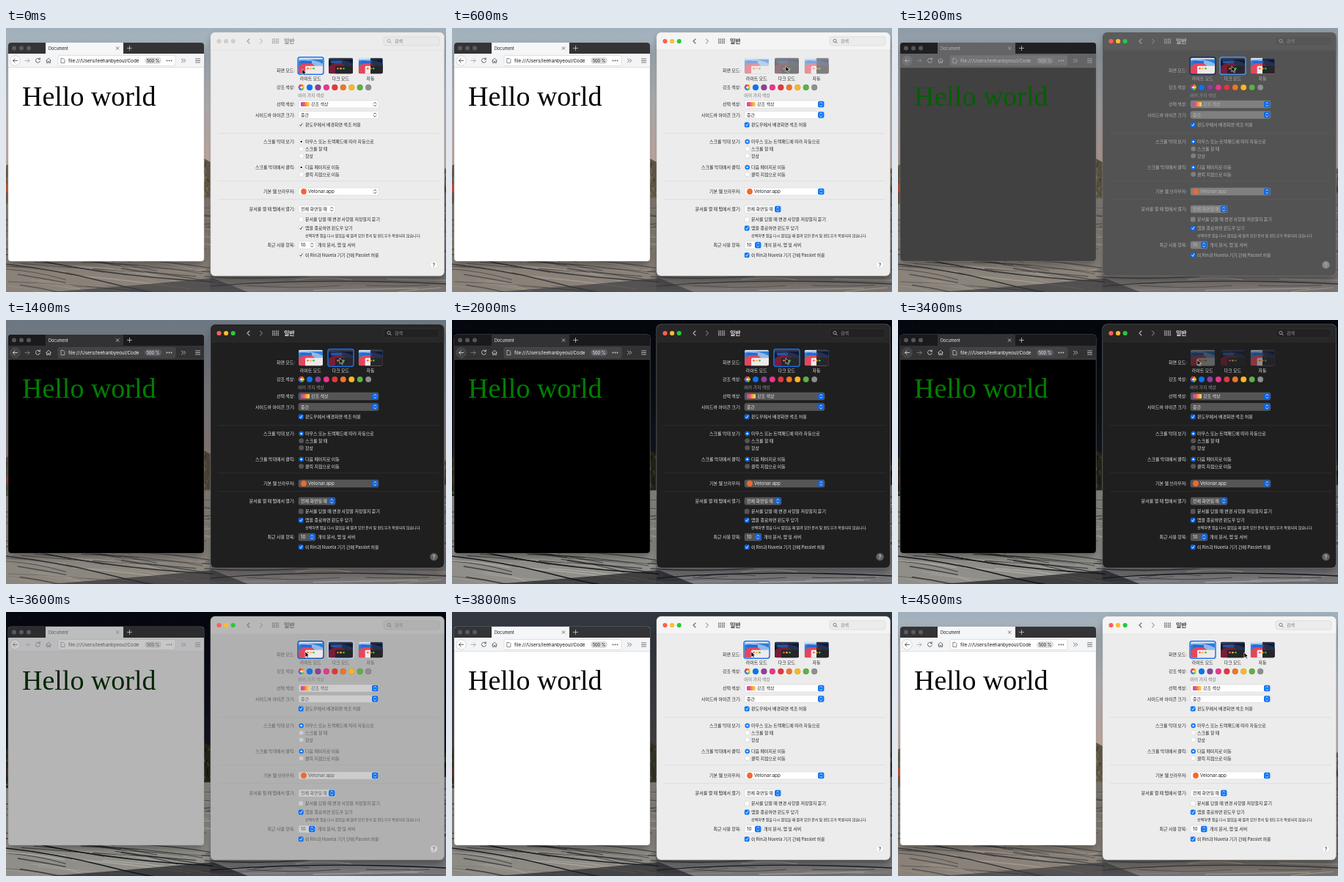
An HTML page that plays this animation: 600x360 px, repeating every 4.6 s.

```html
<!DOCTYPE html>
<html>
<head>
<meta charset="utf-8">
<title>Appearance switch</title>
<style>
html, body { margin: 0; width: 100%; height: 100%; overflow: hidden; background: #000; }
svg { display: block; width: 600px; height: 360px; }
text { white-space: pre; font-family: "Noto Sans CJK KR", "Noto Sans CJK", "Noto Sans CJK JP", sans-serif; font-weight: 500; }
text.ui { font-family: Inter, "Noto Sans CJK KR", sans-serif; font-weight: 400; }
text.serif { font-family: "Liberation Serif", "Times New Roman", serif; font-weight: 400; }
</style>
</head>
<body>
<svg id="stage" viewBox="0 0 600 360" xmlns="http://www.w3.org/2000/svg"></svg>
<script>
const LOOP = 4600, STEP = 100;

const light = {
  id: 'light', pick: 0, win: '#ececec', bar: '#f4f4f4', edge: '#b9b9b9', line: '#d6d6d6',
  ink: '#252525', soft: '#7b7b7b', title: '#3a3a3a', tool: '#666', field: '#fff', fieldEdge: '#cfcfcf',
  search: '#ececec', accent: '#0a74f5', mark: '#fff', lamps: ['#fe5f57', '#febc2e', '#28c840'],
  strip: '#343437', tab: '#f5f6f7', nav: '#f3f4f5', navInk: '#55555a', url: '#fff', urlEdge: '#c6c6ca',
  urlInk: '#18181a', badge: '#dededf', page: '#fff', hello: '#000', lampOff: '#5c5c60', help: '#fff'
};
const idle = { ...light, id: 'idle', bar: '#ececec', title: '#8d8d8d', tool: '#a0a0a0', search: '#e8e8e8',
  accent: '#fff', mark: '#222', lamps: ['#cfcfcf', '#cfcfcf', '#cfcfcf'] };
const dark = {
  id: 'dark', pick: 1, win: '#1f1f1f', bar: '#272727', edge: '#555', line: '#363636',
  ink: '#e6e6e6', soft: '#9a9a9a', title: '#e4e4e4', tool: '#b5b5b5', field: '#555', fieldEdge: '#626262',
  search: '#222', accent: '#0a63e0', mark: '#fff', lamps: ['#fe5f57', '#febc2e', '#28c840'],
  strip: '#1a1a1d', tab: '#323234', nav: '#323234', navInk: '#d2d2d5', url: '#434346', urlEdge: '#57575a',
  urlInk: '#f4f4f6', badge: '#5d5d61', page: '#000', hello: '#008000', lampOff: '#55555a', help: '#626262'
};

const rect = (x, y, w, h, fill, r = 0, more = '') =>
  `<rect x="${x}" y="${y}" width="${w}" height="${h}" rx="${r}" fill="${fill}" ${more}/>`;
const dot = (x, y, r, fill, more = '') => `<circle cx="${x}" cy="${y}" r="${r}" fill="${fill}" ${more}/>`;
const line = (d, color, w = 1, more = '') =>
  `<path d="${d}" fill="none" stroke="${color}" stroke-width="${w}" stroke-linecap="round" stroke-linejoin="round" ${more}/>`;
// y is the middle of the line of text
const text = (x, y, s, fill, size = 6, more = '') =>
  `<text x="${x}" y="${y + size * .37}" font-size="${size}" fill="${fill}" ${more}>${s}</text>`;
const border = (color, w = .5) => `stroke="${color}" stroke-width="${w}"`;
const UI = 'class="ui"';

function random(seed) {
  return () => (seed = (seed * 16807) % 2147483647) / 2147483647;
}

function wallpaper(night) {
  const rnd = random(77);
  const c = night
    ? { sky: ['#05070e', '#0a0d16', '#151821'], land: '#25281d', leaf: ['#47502b', '#11130e', '#3a3a24'],
        wood: '#8f8e89', slate: '#77777a', deep: '#15161a', pale: '#bdbbb4', spot: '#3d2823' }
    : { sky: ['#a0b0bc', '#bfc0c3', '#d8b8ac'], land: '#6c6250', leaf: ['#83804d', '#443f36', '#a18a6c'],
        wood: '#8a8279', slate: '#77726e', deep: '#393a3e', pale: '#b3a89a', spot: '#c4573f' };
  const id = 'sky' + (night ? 1 : 0);
  let s = `<linearGradient id="${id}" x2="0" y2="1">` +
    c.sky.map((k, i) => `<stop offset="${i / 2}" stop-color="${k}"/>`).join('') + '</linearGradient>';
  s += rect(0, 0, 600, 195, `url(#${id})`);
  if (night) for (let i = 0; i < 60; i++) s += dot(rnd() * 600, rnd() * 170, .35, '#aab', 'opacity=".6"');
  s += `<path d="M0 188L6 183 270 178 281 184 590 190 600 192V360H0Z" fill="${c.land}"/>`;
  for (let i = 0; i < 70; i++) {
    const x = [0, 268, 596][i % 3] + rnd() * 12, y = 182 + rnd() * 58;
    s += line(`M${x} ${y}l${rnd() * 5 - 2.5} ${2 + rnd() * 5}`, c.leaf[i % 7 % 3], 1.3);
  }
  s += `<ellipse cx="0" cy="218" rx="4" ry="7" fill="${c.spot}"/>`;
  s += `<path d="M0 240L140 236 285 232 285 360H0Z" fill="${c.wood}"/>`;
  s += `<path d="M278 240L600 225V360H278Z" fill="${c.slate}"/>`;
  for (let i = 0; i < 90; i++) {
    const y = 230 + rnd() * 130, x = rnd() * 190 - 30, w = 60 + rnd() * 120, bow = rnd() * 8 - 1;
    s += line(`M${x} ${y}q${w / 2} ${bow} ${w} ${9 + rnd() * 13}`, i % 2 ? c.pale : c.deep, .4 + rnd() * 1.2, 'opacity=".65"');
  }
  for (let i = 0; i < 90; i++) {
    const y = 230 + rnd() * 134, x = 255 + rnd() * 310, w = 40 + rnd() * 110, bow = rnd() * 12 - 6;
    s += line(`M${x} ${y}q${w / 2} ${bow} ${w} ${rnd() * 8 - 6}`, i % 2 ? c.pale : c.deep, .4 + rnd() * 1.2, 'opacity=".6"');
  }
  s += `<path d="M60 360Q170 352 282 341L330 360Z" fill="${c.deep}" opacity=".65"/>`;
  s += line('M0 322Q70 330 130 345T200 360', c.deep, 1.6);
  s += line('M40 316Q140 338 280 346', c.deep, 1.4);
  s += line('M280 352Q420 340 600 349', c.deep, 1.4);
  return s;
}

function browser(p) {
  let s = rect(3, 20, 267, 298, p.page, 4, border(p.edge, .4));
  s += `<path d="M3 36V24a4 4 0 0 1 4-4H266a4 4 0 0 1 4 4V36Z" fill="${p.strip}"/>`;
  for (const x of [11, 21, 31]) s += dot(x, 27.5, 3, p.lampOff);
  s += rect(54, 20, 106, 16, p.tab);
  s += text(58, 27.5, 'Document', p.urlInk, 5.5, UI);
  s += line('M150.3 25.8l3.6 3.6m0-3.6l-3.6 3.6', p.navInk, .8);
  s += line('M165.5 27.5h6m-3-3v6', '#c9c9cc', .8);
  s += rect(3, 35, 267, 19, p.nav) + rect(3, 53.6, 267, .5, p.urlEdge);

  s += dot(12.5, 44.5, 6.8, p.url, border(p.urlEdge, .7));
  s += line('M15.5 44.5h-6m2.6-2.6l-2.6 2.6 2.6 2.6', p.navInk, .9);
  s += line('M26 44.5h6m-2.6-2.6l2.6 2.6-2.6 2.6', p.navInk, .9, 'opacity=".45"');
  s += line('M46 42.6a3 3 0 1 0 .4 2.6m-.1-4.4v2h-2', p.navInk, .9);
  s += line('M54.6 44.6l3.4-3.3 3.4 3.3m-5.8-.6v3.6h1.6v-2h1.6v2h1.6v-3.6', p.navInk, .8);
  s += rect(71, 37.5, 160, 14, p.url, 2, border(p.urlEdge));
  s += line('M75.3 41.5h2.8l1.8 1.8v4.4h-4.6z', p.navInk, .7);
  s += `<g clip-path="url(#urlClip)">${text(85, 44.5, 'file:///Users/leehanbyeoul/Code', p.urlInk, 6.4, UI)}</g>`;
  s += rect(189, 40, 23, 9, p.badge, 4.5);
  s += text(200.5, 44.5, '500 %', p.urlInk, 5.7, UI + ' text-anchor="middle"');
  for (const x of [219.5, 222.5, 225.5]) s += dot(x, 44.5, .9, p.navInk);
  s += line('M239.5 42.2l2.3 2.3-2.3 2.3m3-4.6l2.3 2.3-2.3 2.3', p.navInk, .8);
  s += line('M258.5 42h6m-6 2.5h6m-6 2.5h6', p.navInk, .8);
  return s + `<text class="serif" x="22" y="105.5" font-size="38" fill="${p.hello}">Hello world</text>`;
}

function thumb(x, kind) {
  const half = night => {
    const [a, b, c, win] = night
      ? ['#101a38', '#26304f', '#741f36', '#26262a'] : ['#2c7fd8', '#8fb9ea', '#e2475c', '#f0e9ea'];
    return rect(0, 0, 33, 21.5, a) +
      `<path d="M0 12Q11 2 33 9V22H0Z" fill="${c}"/><path d="M0 4Q13 2 20 9T33 13V8Q20 1 0 1Z" fill="${b}"/>` +
      rect(0, 0, 33, 2, night ? '#3a3f52' : '#dce8f5') + rect(3, 4, 15, 3.6, night ? '#2456a5' : '#2868d5', 1) +
      rect(9, 11, 25, 12, win, 1.5) +
      ['#fe5f57', '#febc2e', '#28c840'].map((k, i) => dot(12.5 + i * 4, 14.5, 1.3, k)).join('');
  };
  const art = kind < 2 ? half(kind) : half(0) + `<g clip-path="url(#rightHalf)">${half(1)}</g>`;
  return `<g transform="translate(${x} 40.7)"><g clip-path="url(#thumbClip)">${art}` +
    `${rect(0, 0, 33, 21.5, '#000', 0, `class="press${kind}" opacity="0"`)}</g></g>`;
}

function popup(p, y, w, label, inset = 3, cls = '') {
  const r = 399 + w;
  return rect(399, y - 5, w, 10, p.field, 2.3, border(p.fieldEdge)) +
    rect(r - 9, y - 4.3, 8.4, 8.6, p.accent, 2) +
    line(`M${r - 6.4} ${y - 1.1}l1.6-1.6 1.6 1.6m-3.2 2.2l1.6 1.6 1.6-1.6`, p.mark, .8) +
    text(399 + inset, y, label, p.ink, cls ? 6.4 : 6, cls);
}

function check(p, y, label, on) {
  const box = on ? p.accent : p.field;
  return rect(399, y - 3.2, 6.4, 6.4, box, 1.5, border(on && p.mark === '#fff' ? box : p.edge, .4)) +
    (on ? line(`M400.6 ${y + .1}l1.3 1.6 2-3.4`, p.mark, .9) : '') + text(408, y, label, p.ink);
}

function radio(p, y, label, on) {
  return dot(402.7, y, 3.3, on ? p.accent : p.field, border(p.edge, .4)) +
    (on ? dot(402.7, y, 1.3, p.mark) : '') + text(408, y, label, p.ink);
}

function settings(p) {
  let s = rect(279, 6, 318.5, 332, p.win, 6, border(p.edge));
  s += `<path d="M279.2 30V12a6 6 0 0 1 6-5.8H591.3a6 6 0 0 1 6 5.8V30Z" fill="${p.bar}"/>`;
  s += rect(279, 29.8, 318.5, .5, p.line);
  p.lamps.forEach((k, i) => s += dot(290.5 + i * 9.6, 18, 3.1, k));
  s += line('M332 15l-3 3 3 3', p.tool, 1.1) + line('M346.5 15l3 3-3 3', p.tool, 1.1, 'opacity=".5"');
  for (let i = 0; i < 12; i++) s += rect(363 + i % 4 * 2.5, 14.6 + (i >> 2) * 2.5, 1.6, 1.6, p.tool);
  s += text(379, 18, '일반', p.title, 8, 'style="font-weight:700"');
  s += rect(515, 12, 76, 12, p.search, 3, border(p.line, .7));
  s += dot(522, 17.5, 2.1, 'none', border(p.tool, .8)) + line('M523.6 19.1l1.7 1.7', p.tool, .8);
  s += text(530, 18, '검색', p.soft);

  const labels = { 58: '화면 모드:', 81: '강조 색상:', 104: '선택 색상:', 118.5: '사이드바 아이콘 크기:',
    155: '스크롤 막대 보기:', 190: '스크롤 막대에서 클릭:', 223: '기본 웹 브라우저:',
    247: '문서를 열 때 탭에서 열기:', 296: '최근 사용 항목:' };
  for (const y in labels) s += text(394, +y, labels[y], p.ink, 6, 'text-anchor="end"');

  const spots = [399, 440, 480.7];
  s += rect(spots[p.pick] - 1, 39.7, 35, 23.5, 'none', 3, `class="ring" ${border('#1676f0', 1.5)}`);
  s += `<g class="thumbs">${spots.map(thumb).join('')}</g>`;
  ['라이트 모드', '다크 모드', '자동'].forEach((name, i) =>
    s += text(spots[i] + 16.3, 69, name, p.ink, 6, 'text-anchor="middle"'));

  const wheel = ['#f7821b', '#ffc600', '#62ba46', '#0a7aff', '#a550a7', '#e0383e'];
  s += wheel.map((k, i) => `<path d="M402.7 81v-4.2a4.2 4.2 0 0 1 3.64 2.1Z" fill="${k}" transform="rotate(${i * 60} 402.7 81)"/>`).join('');
  s += dot(402.7, 81, 1.5, '#fff');
  ['#0a74f5', '#8f3f98', '#e8378b', '#e0383e', '#f0752a', '#f9b825', '#5cb143', '#8e8e90'].forEach((k, i) =>
    s += dot(414 + i * 11.45, 81, 4, k, border('rgba(0,0,0,.25)', .4)));
  s += text(398, 91.5, '여러 가지 색상', p.soft);

  s += popup(p, 104, 109, '강조 색상', 17) + rect(402, 101, 12, 6, 'url(#swatch)', 1);
  s += popup(p, 118.5, 109, '중간');
  s += check(p, 132, '윈도우에서 배경화면 색조 허용', 1);
  for (const y of [143.5, 208.5, 233.5]) s += rect(289, y, 302, .6, p.line);
  s += radio(p, 155, '마우스 또는 트랙패드에 따라 자동으로', 1);
  s += radio(p, 164.7, '스크롤 할 때') + radio(p, 174.3, '항상');
  s += radio(p, 190, '다음 페이지로 이동', 1) + radio(p, 199.5, '클릭 지점으로 이동');
  s += popup(p, 223, 109, 'Velonar.app', 13, UI) + dot(406, 223, 3.9, '#f2682c');
  s += popup(p, 247, 50, '전체 화면일 때');
  s += check(p, 261, '문서를 닫을 때 변경 사항을 저장할지 묻기');
  s += check(p, 273, '앱을 종료하면 윈도우 닫기', 1);
  s += text(408, 283, '선택하면 앱을 다시 열었을 때 열려 있던 문서 및 윈도우가 복원되지 않습니다.', p.ink, 5.05);
  s += popup(p, 296, 23, '10', 3, UI) + text(425, 296, '개의 문서, 앱 및 서버', p.ink);
  s += check(p, 309.7, '이 Rin과 Nuvela 기기 간에 Passlet 허용', 1);
  s += dot(583.5, 323, 5, p.help, border(p.fieldEdge));
  return s + text(583.5, 323, '?', p.ink, 7.5, UI + ' text-anchor="middle"');
}

const scene = p => `<g id="${p.id}">${browser(p)}${settings(p)}</g>`;
const stage = document.getElementById('stage');
stage.innerHTML = `<defs>
  <clipPath id="urlClip"><rect x="84" y="38" width="102" height="13"/></clipPath>
  <clipPath id="thumbClip"><rect width="33" height="21.5" rx="2.5"/></clipPath>
  <clipPath id="rightHalf"><rect x="16.5" width="17" height="22"/></clipPath>
  <linearGradient id="swatch"><stop stop-color="#b34fc4"/><stop offset=".35" stop-color="#f0566b"/>
    <stop offset=".7" stop-color="#fbb03c"/><stop offset="1" stop-color="#f7d774"/></linearGradient>
  <filter id="blur" x="-20%" y="-20%" width="140%" height="140%"><feGaussianBlur stdDeviation="6"/></filter>
  </defs>
  <g>${wallpaper(false)}</g><g id="night">${wallpaper(true)}</g>
  <g filter="url(#blur)" opacity=".4">${rect(4, 26, 265, 296, '#000', 5)}${rect(280, 13, 317, 330, '#000', 6)}</g>
  ${[light, idle, dark].map(scene).join('')}
  <path id="cursor" d="M0 0V7.6L1.8 6 3.1 8.8 4.4 8.2 3.1 5.5H5.5Z" fill="#000" stroke="#fff" stroke-width=".6"/>`;

const get = id => document.getElementById(id);
const all = sel => stage.querySelectorAll(sel);
const show = (el, v) => el.setAttribute('opacity', v);
const ramp = (t, a, b) => Math.min(1, Math.max(0, (t - a) / (b - a)));
const ease = k => k * k * (3 - 2 * k);

const route = [[0, 404, 56], [100, 404, 56], [500, 455, 52], [2700, 455, 52],
  [3300, 408, 54], [3900, 408, 54], [4500, 472, 55]];

function cursorAt(t) {
  let i = 0;
  while (i < route.length - 2 && t >= route[i + 1][0]) i++;
  const [a, b] = [route[i], route[i + 1]], k = ease(ramp(t, a[0], b[0]));
  return [a[1] + (b[1] - a[1]) * k, a[2] + (b[2] - a[2]) * k];
}

function draw(time) {
  const t = Math.floor((time % LOOP) / STEP) * STEP;
  show(get('dark'), ramp(t, 930, 1295) - ramp(t, 3400, 3680));
  show(get('night'), ramp(t, 1100, 2000) - ramp(t, 3600, 4300));
  show(get('idle'), t < 200 ? 1 : 0);
  const down = t >= 600 && t < 1000 ? 1 : t >= 3400 && t < 3500 ? 0 : -1;
  all('.thumbs').forEach(el => show(el, down < 0 ? 1 : .55));
  all('.ring').forEach(el => show(el, down < 0 ? 1 : 0));
  [0, 1].forEach(i => all('.press' + i).forEach(el => show(el, down === i ? .35 : 0)));
  get('cursor').setAttribute('transform', `translate(${cursorAt(t).join(' ')})`);
}

const start = performance.now();
function tick() {
  draw(performance.now() - start);
  requestAnimationFrame(tick);
}
tick();
</script>
</body>
</html>
```
